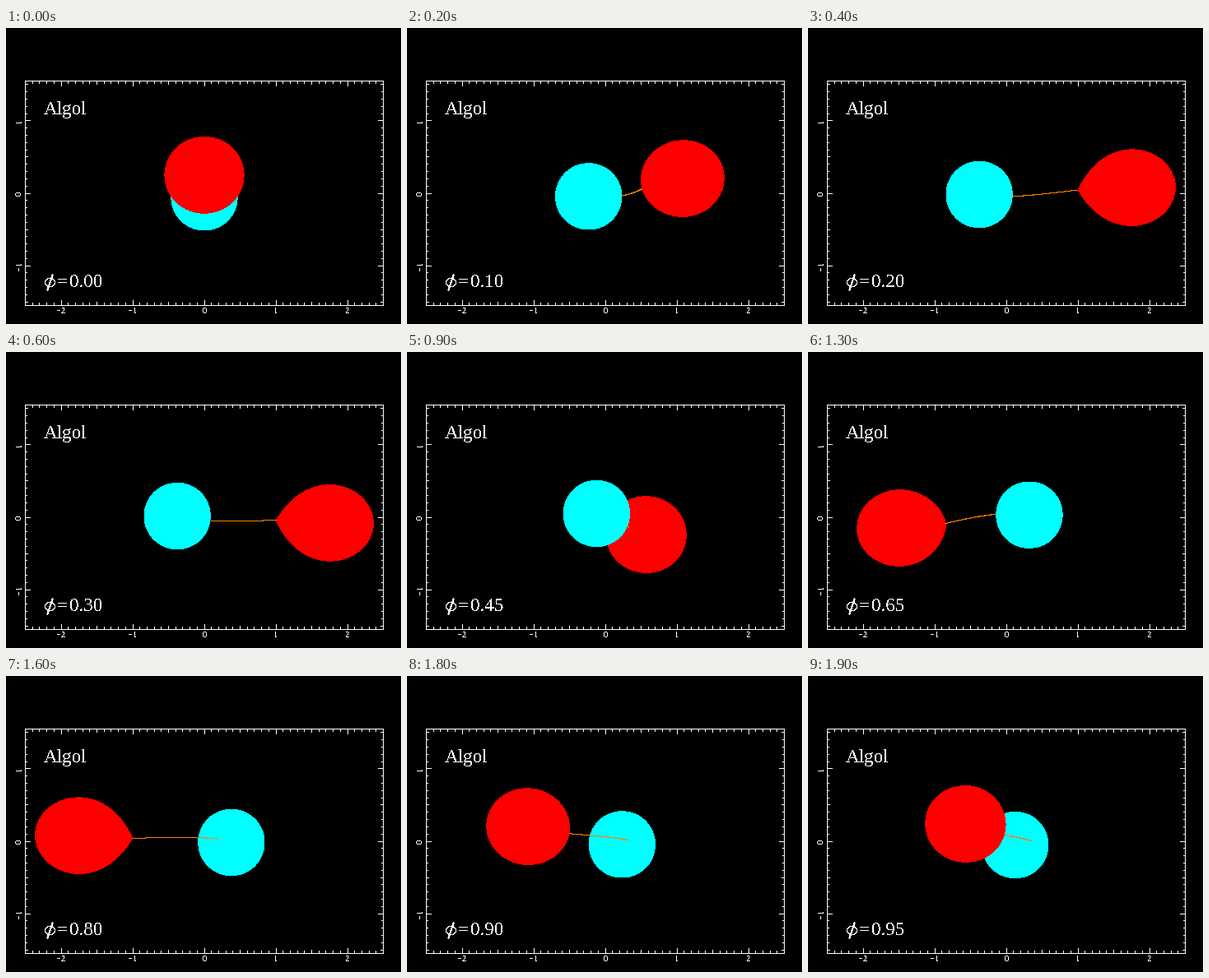
A matplotlib script that plays this animation: 480x360 px, repeating every 2 s.

```python
import numpy as np
import matplotlib.pyplot as plt
from matplotlib.animation import FuncAnimation
from matplotlib.collections import LineCollection
from matplotlib.patches import Polygon

W, H, DPI = 480, 360, 100
FRAMES, STEP = 20, 100
LEFT, RIGHT, TOP, BOTTOM = 23.5, 458.5, 64.5, 337.5
XMAX, YMAX = 2.5, 1.55
CX, CY = (LEFT + RIGHT) / 2, (TOP + BOTTOM) / 2
SX, SY = (RIGHT - LEFT) / 2 / XMAX, (BOTTOM - TOP) / 2 / YMAX
PX = 72 / DPI

# Binary: mass ratio, separation, inclination, radius of the hot star
Q, SEP, R1 = 0.217, 2.228, 0.207
COS_I = 0.138
SIN_I = np.sqrt(1 - COS_I**2)
XC = Q / (1 + Q)


def snap(p):
    return np.floor(p) + 0.5


# ---------- Roche geometry, hot star at 0 and cool star at x = 1 ----------
def omega(x, y, z):
    r1 = np.sqrt(x**2 + y**2 + z**2)
    r2 = np.sqrt((x - 1)**2 + y**2 + z**2)
    return 1 / r1 + Q / r2 + (1 + Q) / 2 * ((x - XC)**2 + y**2)


axis_x = np.linspace(0.4, 0.9, 100001)
L1 = axis_x[np.argmin(omega(axis_x, 0, 0))]


def roche_lobe():
    th, ps = np.meshgrid(np.linspace(0, np.pi, 91),
                         np.linspace(0, 2 * np.pi, 72, endpoint=False))
    d = np.array([-np.cos(th), np.sin(th) * np.cos(ps),
                  np.sin(th) * np.sin(ps)]).reshape(3, -1)
    level = omega(L1, 0, 0)
    lo, hi = np.full(d.shape[1], 1e-3), np.full(d.shape[1], 1 - L1)
    for _ in range(40):
        r = (lo + hi) / 2
        inside = omega(1 + r * d[0], r * d[1], r * d[2]) > level
        lo, hi = np.where(inside, r, lo), np.where(inside, hi, r)
    return np.array([1 + lo * d[0], lo * d[1], lo * d[2]])


def gas_stream():
    """Ballistic path from the inner Lagrange point to the hot star."""
    def rate(s):
        x, y, vx, vy = s
        a = 1 / np.hypot(x, y)**3 / (1 + Q)
        b = Q / np.hypot(x - 1, y)**3 / (1 + Q)
        return np.array([vx, vy,
                         2 * vy + x - XC - a * x - b * (x - 1),
                         -2 * vx + y - a * y - b * y])

    s, dt, path = np.array([L1 - 0.004, 0, 0, 0]), 0.003, [(L1, 0)]
    while np.hypot(s[0], s[1]) > R1 and len(path) < 3000:
        path.append((s[0], s[1]))
        s = s + dt * rate(s + dt / 2 * rate(s))
    path.append((s[0], s[1]))
    x, y = np.array(path).T
    return np.array([x, y, np.zeros_like(x)])


LOBE, STREAM = roche_lobe(), gas_stream()


def project(p, phi):
    """Pixel x, pixel y and depth towards the viewer."""
    x, y, z = SEP * (p[0] - XC), SEP * p[1], SEP * p[2]
    near = x * np.cos(phi) - y * np.sin(phi)
    across = x * np.sin(phi) + y * np.cos(phi)
    up = near * COS_I + z * SIN_I
    return CX + SX * across, CY - SX * up, near * SIN_I - z * COS_I


turn = np.linspace(0, 2 * np.pi, 360, endpoint=False)
CIRCLE = np.column_stack([np.cos(turn), np.sin(turn)])


def outline(p, phi):
    """Convex silhouette: the farthest projected point in each direction."""
    x, y, _ = project(p, phi)
    xy = np.column_stack([x, y])
    return xy[np.argmax(CIRCLE @ xy.T, axis=1)]


# ---------- stage ----------
fig = plt.figure(figsize=(W / DPI, H / DPI), dpi=DPI, facecolor="black")
ax = fig.add_axes([0, 0, 1, 1])
ax.set_xlim(0, W)
ax.set_ylim(H, 0)
ax.axis("off")


def strokes(segments, color="white", z=6):
    lc = LineCollection(segments, colors=color, linewidths=PX, zorder=z,
                        antialiaseds=False, capstyle="projecting")
    lc.set_snap(False)
    return ax.add_collection(lc, autolim=False)


def text(s, x, y, size, **kw):
    return ax.text(x, y, s, color="white", fontsize=size * PX, zorder=6,
                   family="Liberation Serif", antialiased=False, **kw)


def star(color):
    return ax.add_patch(Polygon(CIRCLE, color=color, lw=0, antialiased=False))


def tick_length(k, minor):
    return 6 if k % 10 == 0 else minor + 1 if k % 5 == 0 else minor


def axes_box():
    segs = [[(LEFT, TOP), (RIGHT, TOP), (RIGHT, BOTTOM), (LEFT, BOTTOM),
             (LEFT, TOP)]]
    for k in range(-24, 25):
        x, n = snap(CX + SX * k / 10), tick_length(k, 3)
        segs += [[(x, TOP), (x, TOP + n)], [(x, BOTTOM), (x, BOTTOM - n)]]
    for k in range(-15, 16):
        y, n = snap(CY - SY * k / 10), tick_length(k, 2)
        segs += [[(LEFT, y), (LEFT + n, y)], [(RIGHT, y), (RIGHT - n, y)]]
    strokes(segs)
    for k in range(-2, 3):
        label = f"{k}".replace("-", "\u2212")
        text(label, CX + SX * k, 347, 10.5, ha="center", va="baseline")
        if abs(k) < 2:
            text(label, 16.5, CY - SY * k, 10.5, ha="center", va="center",
                 rotation=90)


def phi_sign(x, y):
    """Slanted phi: an oval crossed by a leaning stem."""
    strokes([snap([x, y] + CIRCLE * (6, 5)), [(x + 3, y - 9), (x - 3, y + 9)]])


axes_box()
text("Algol", 45.5, 105, 23)
phi_sign(53.5, 309.5)
text("=", 68.5, 315, 23, ha="center")
phase_text = text("", 77, 315, 23)
hot, cool = star("cyan"), star("red")
stream = strokes([], (1, 0.5, 0), 3)
hot.set_zorder(2)


def draw(i):
    phase = i / FRAMES
    phi = 2 * np.pi * phase

    hx, hy, hd = project(np.zeros(3), phi)
    radius = R1 * SEP * SX
    hot.set_xy([hx, hy] + CIRCLE * radius)

    cool.set_xy(outline(LOBE, phi))
    cool.set_zorder(4 if np.cos(phi) > 1e-9 else 1)

    x, y, d = project(STREAM, phi)
    hidden = (np.hypot(x - hx, y - hy) < radius) & (d < hd)
    seen = np.flatnonzero(~hidden)
    runs = np.split(seen, np.flatnonzero(np.diff(seen) > 1) + 1)
    path = snap(np.column_stack([x, y]))
    stream.set_segments([path[r] for r in runs if len(r) > 1])

    phase_text.set_text(f"{phase:.2f}")
    return hot, cool, stream, phase_text


anim = FuncAnimation(fig, draw, frames=FRAMES, interval=STEP, repeat=True,
                     repeat_delay=0, init_func=lambda: draw(0))
plt.show()
```
